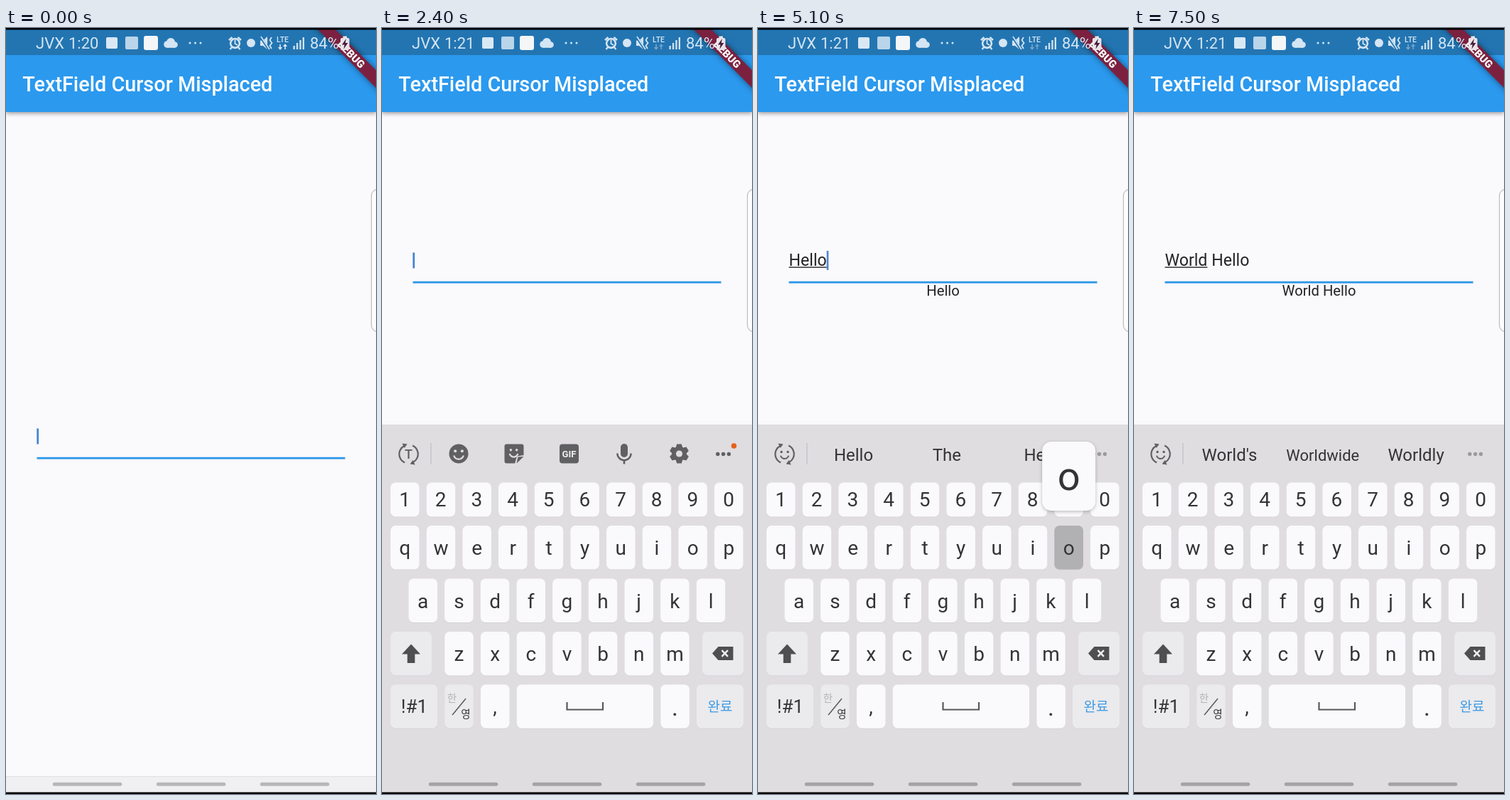
Recreate the animation shown at these times as an HTML page with a canvas. Size 521 by 1076 pixels, loop 8000 ms.

```html
<!DOCTYPE html>
<html lang="en">
<head>
<meta charset="utf-8">
<title>TextField Cursor Misplaced</title>
<style>
html, body { margin: 0; width: 100%; height: 100%; overflow: hidden; background: #faf9fb; }
canvas { display: block; width: 521px; height: 1076px; }
</style>
</head>
<body>
<canvas id="stage"></canvas>
<script>
const W = 521, H = 1076, LOOP = 8000, STEP = 100;
const ROBOTO = 'Roboto, sans-serif';
const KOREAN = '"Noto Sans CJK KR", "Noto Sans CJK", sans-serif';
const INK = '#343336', ICON = '#605f62', BAR = '#d4e5f3', BLUE = '#2b97e8';
const PITCH = 50.67, LEFT = 43.5;

const canvas = document.getElementById('stage');
const dpr = window.devicePixelRatio || 1;
canvas.width = W * dpr;
canvas.height = H * dpr;
const c = canvas.getContext('2d');

// Each entry changes part of the state from its time on.
const timeline = [
  [0, { clock: '1:20', caret: true, pos: 0, text: '', comp: 0, slide: 1, up: false,
        lang: 'ko', upper: false, press: '', words: null, busy: true }],
  [100, { clock: '1:21' }],
  [400, { slide: 0.5 }],
  [500, { slide: 0.12, up: true }],
  [600, { slide: 0 }],
  [1300, { caret: false }],
  [1400, { busy: false }],
  [1900, { caret: true, press: 'lang' }],
  [2100, { lang: 'en' }],
  [2200, { press: '' }],
  [2800, { caret: false }],
  [2900, { upper: true }],
  [3200, { press: 'h', caret: true }],
  [3300, { text: 'H', pos: 1, comp: 1 }],
  [3400, { press: '', upper: false }],
  [3600, { press: 'e' }],
  [3700, { text: 'He', pos: 2, comp: 2 }],
  [3800, { press: '' }],
  [3900, { words: ['Hello', 'The', "He's"] }],
  [4200, { caret: false }],
  [4400, { press: 'l' }],
  [4500, { text: 'Hel', pos: 3, comp: 3, caret: true }],
  [4600, { press: '' }],
  [4700, { press: 'l' }],
  [4800, { text: 'Hell', pos: 4, comp: 4 }],
  [4900, { press: '' }],
  [5000, { press: 'o' }],
  [5100, { text: 'Hello', pos: 5, comp: 5 }],
  [5200, { press: '' }],
  [5300, { pos: 0, comp: 0, words: null }],
  [5400, { press: 'space' }],
  [5500, { text: ' Hello', pos: 1, press: '' }],
  [5700, { press: 'shift', upper: true }],
  [5800, { press: '' }],
  [6000, { press: 'w' }],
  [6100, { text: 'W Hello', pos: 1, comp: 1 }],
  [6200, { press: '', upper: false }],
  [6300, { press: 'o' }],
  [6400, { text: 'Wo Hello', pos: 2, comp: 2 }],
  [6500, { press: 'r' }],
  [6600, { text: 'Wor Hello', pos: 3, comp: 3, press: '' }],
  [6800, { press: 'l' }],
  [6900, { text: 'Worl Hello', pos: 4, comp: 4 }],
  [7000, { press: '' }],
  [7100, { press: 'd' }],
  [7200, { text: 'World Hello', pos: 5, comp: 5 }],
  [7300, { press: '', words: ["World's", 'Worldwide', 'Worldly'] }],
  [7500, { caret: false }]
];

const layouts = {
  en: ['qwertyuiop', 'asdfghjkl', 'zxcvbnm'],
  ko: ['ㅂㅈㄷㄱㅅㅛㅕㅑㅐㅔ', 'ㅁㄴㅇㄹㅎㅗㅓㅏㅣ', 'ㅋㅌㅊㅍㅠㅜㅡ']
};
const rows = [{ x: 12, y: 699 }, { x: 37.4, y: 773.5 }, { x: 88.2, y: 848 }];

function stateAt(ms) {
  return Object.assign({}, ...timeline.filter(e => e[0] <= ms).map(e => e[1]));
}

function rect(x, y, w, h, color) {
  c.fillStyle = color;
  c.fillRect(x, y, w, h);
}

function roundPath(x, y, w, h, r) {
  c.beginPath();
  c.moveTo(x + r, y);
  c.arcTo(x + w, y, x + w, y + h, r);
  c.arcTo(x + w, y + h, x, y + h, r);
  c.arcTo(x, y + h, x, y, r);
  c.arcTo(x, y, x + w, y, r);
  c.closePath();
}

function round(x, y, w, h, r, color) {
  roundPath(x, y, w, h, r);
  c.fillStyle = color;
  c.fill();
}

function dot(x, y, r, color) {
  c.beginPath();
  c.arc(x, y, r, 0, 2 * Math.PI);
  c.fillStyle = color;
  c.fill();
}

function arc(x, y, r, from, to, color, width) {
  c.beginPath();
  c.arc(x, y, r, from, to);
  c.strokeStyle = color;
  c.lineWidth = width;
  c.stroke();
}

function line(points, color, width) {
  c.beginPath();
  points.forEach(([x, y], i) => i ? c.lineTo(x, y) : c.moveTo(x, y));
  c.strokeStyle = color;
  c.lineWidth = width;
  c.stroke();
}

function poly(points, color) {
  c.beginPath();
  points.forEach(([x, y]) => c.lineTo(x, y));
  c.closePath();
  c.fillStyle = color;
  c.fill();
}

function label(str, x, y, size, color, align = 'left', weight = 400, family = ROBOTO) {
  c.font = `${weight} ${size}px ${family}`;
  c.textAlign = align;
  c.fillStyle = color;
  c.fillText(str, x, y);
}

function widthOf(str, size) {
  c.font = `400 ${size}px ${ROBOTO}`;
  return c.measureText(str).width;
}

function drawHeader() {
  c.save();
  c.shadowColor = 'rgba(0,0,0,0.4)';
  c.shadowBlur = 6 * dpr;
  c.shadowOffsetY = 2 * dpr;
  rect(0, 2, W, 116, '#2b99ee');
  c.restore();
  rect(0, 2, W, 36, '#2375b2');
  label('TextField Cursor Misplaced', 23.2, 89, 28.8, '#fff', 'left', 500);
}

function drawRibbon() {
  c.save();
  c.translate(W, 2);
  c.rotate(Math.PI / 4);
  c.save();
  c.shadowColor = 'rgba(0,0,0,0.5)';
  c.shadowBlur = 8 * dpr;
  rect(-90, 40.5, 180, 17.4, '#7b213f');
  c.restore();
  label('DEBUG', 0, 54.5, 14.8, '#fff', 'center', 900);
  c.restore();
}

function drawStatus(s) {
  label('JVX', 42, 29, 22, BAR);
  label(s.clock, 88, 29, 22, BAR);
  round(141, 13, 16, 16, 2, '#d9e8f4');
  round(168, 12, 18, 18, 2, '#b9d5ea');
  round(194, 11, 20, 20, 3, '#f4f6f8');

  dot(227, 23, 4.8, BAR);
  dot(232, 20, 6, BAR);
  dot(237.5, 23.5, 4.3, BAR);
  rect(227, 22, 11, 5.8, BAR);
  [259, 266.5, 274].forEach(x => dot(x, 21, 1.5, BAR));

  // Alarm
  arc(322.5, 21.5, 6.4, 0, 2 * Math.PI, BAR, 2.6);
  line([[322.5, 17], [322.5, 22], [326, 24]], BAR, 1.8);
  line([[314, 17], [318.5, 13]], BAR, 2.4);
  line([[331, 17], [326.5, 13]], BAR, 2.4);
  line([[318, 27], [315.5, 30]], BAR, 2.2);
  line([[327, 27], [329.5, 30]], BAR, 2.2);
  dot(345, 21, 6, BAR);

  // Muted speaker with vibration
  poly([[358, 17.5], [362, 17.5], [368, 12], [368, 30], [362, 25], [358, 25]], BAR);
  line([[358, 12], [370, 30]], '#2375b2', 3.2);
  line([[359, 12], [371, 30]], BAR, 1.6);
  line([[374, 13], [371.5, 17], [374.5, 21], [371.5, 25], [374, 29]], BAR, 1.8);

  label('LTE', 389.5, 20, 10.5, BAR, 'center', 500);
  const up = s.busy ? BAR : '#6e9fc8', down = s.busy ? BAR : '#75a5cc';
  line([[386, 30], [386, 23]], down, 1.7);
  poly([[382.8, 27], [389.2, 27], [386, 31]], down);
  line([[393, 30], [393, 23]], up, 1.7);
  poly([[389.8, 26], [396.2, 26], [393, 22]], up);
  for (let i = 0; i < 4; i++) rect(404.5 + i * 4.4, 25 - i * 4, 2.3, 5 + i * 4, BAR);
  label('84%', 428, 29, 22, BAR);

  round(471, 14, 12.5, 17, 2, '#e9e4ea');
  rect(474.5, 11.5, 5.5, 3, '#e9e4ea');
  poly([[479, 15], [473, 23.5], [476.6, 23.5], [475.5, 29.5], [481.5, 21], [477.8, 21]], '#451d3a');
}

function drawField(s) {
  const y = s.up ? 0 : 247;
  if (s.text) {
    label(s.text, LEFT, 334 + y, 23.15, '#232225');
    label(s.text, 260.5, 376 + y, 20.26, '#232225', 'center');
    if (s.comp) rect(LEFT, 335.4 + y, widthOf(s.text.slice(0, s.comp), 23.15), 1.5, '#343336');
  }
  if (s.caret) {
    const x = LEFT + widthOf(s.text.slice(0, s.pos), 23.15);
    if (s.text) rect(x, 313 + y, 2.6, 27, '#4a86d2');
    else rect(43.3, 315.5 + y, 2.8, 22, '#4586d2');
  }
  rect(LEFT, 355.8 + y, 434, 2.8, BLUE);
}

function drawEdgePanel() {
  roundPath(514.5, 226.5, 30, 200, 9);
  c.fillStyle = '#fdfdfe';
  c.fill();
  c.strokeStyle = '#bcbbbd';
  c.lineWidth = 1.2;
  c.stroke();
}

function drawModeIcon(x, y, words) {
  arc(x, y, 13.2, 2.0, 4.25, ICON, 2.2);
  arc(x, y, 13.2, 5.15, 7.4, ICON, 2.2);
  poly([[x - 9, y - 15], [x - 2, y - 14], [x - 6, y - 8.5]], ICON);
  poly([[x + 9, y + 15], [x + 2, y + 14], [x + 6, y + 8.5]], ICON);
  if (words) {
    dot(x - 4.5, y - 3, 1.7, ICON);
    dot(x + 4.5, y - 3, 1.7, ICON);
    arc(x, y + 0.5, 6, 0.3, Math.PI - 0.3, ICON, 2);
  } else {
    label('T', x, y + 6.5, 18, ICON, 'center', 500);
  }
}

function drawFace(x, y, r, bg) {
  dot(x - r * 0.36, y - r * 0.28, r * 0.15, bg);
  dot(x + r * 0.36, y - r * 0.28, r * 0.15, bg);
  arc(x, y + r * 0.05, r * 0.52, 0.25, Math.PI - 0.25, bg, 2.2);
}

function drawGear(x, y, bg) {
  for (let i = 0; i < 6; i++) {
    c.save();
    c.translate(x, y);
    c.rotate(i * Math.PI / 3);
    poly([[-5, -8], [-3.3, -13.5], [3.3, -13.5], [5, -8]], ICON);
    c.restore();
  }
  dot(x, y, 10.3, ICON);
  dot(x, y, 4.6, bg);
}

function drawToolbar(s, bg) {
  drawModeIcon(37.5, 598.5, s.words);
  rect(68.2, 583, 1.3, 30, '#c3c1c5');
  const dots = s.words ? '#9c9b9e' : ICON;
  [472.8, 480.6, 488.4].forEach(x => dot(x, 598.5, 2.7, dots));
  if (s.words) {
    s.words.forEach((w, i) =>
      label(w, 134.5 + 131.3 * i, 607.5, w.length > 8 ? 22 : 24, INK, 'center'));
    return;
  }
  dot(108, 598, 13.5, ICON);
  drawFace(108, 598, 13.5, bg);

  // Sticker with a folded corner
  round(172.5, 584.5, 27, 27, 3, ICON);
  poly([[200, 600], [200, 612], [187, 612], [190, 601.5]], bg);
  poly([[199.5, 602], [191.5, 602.5], [189.5, 611.5]], ICON);
  drawFace(185.5, 596, 11.5, bg);

  round(250, 584.5, 27, 27, 4, ICON);
  label('GIF', 263.5, 603, 13.2, '#eeedf0', 'center', 700);

  // Microphone
  round(336, 584, 10, 19, 5, ICON);
  arc(341, 597.5, 9.6, 0, Math.PI, ICON, 2.4);
  line([[341, 607], [341, 612.5]], ICON, 2.6);

  drawGear(418.5, 598, bg);
  dot(495.5, 587, 3.8, '#e5621c');
}

function key(x, y, w, h, pressed, soft) {
  round(x, y + 0.8, w, h, 7, '#d2d0d4');
  round(x, y, w, h, 7, pressed ? '#b1b0b2' : soft ? '#ebeaed' : '#faf9fb');
}

function drawLetters(s) {
  let popup = null;
  layouts[s.lang].forEach((row, r) => {
    [...row].forEach((ch, i) => {
      const x = rows[r].x + i * PITCH, y = rows[r].y, on = s.press === ch;
      key(x, y, 40.6, 61.5, on);
      const shown = s.upper ? ch.toUpperCase() : ch;
      if (s.lang === 'ko') label(shown, x + 20.3, y + 40, 25, INK, 'center', 400, KOREAN);
      else label(shown, x + 20.3, y + 41.3, 28, INK, 'center');
      if (on) popup = { ch: shown, x: x + 20.3, y };
    });
  });
  return popup;
}

function drawPopup({ ch, x, y }) {
  const left = Math.min(Math.max(x - 37.5, 3), W - 78);
  c.save();
  c.shadowColor = 'rgba(0,0,0,0.25)';
  c.shadowBlur = 5 * dpr;
  c.shadowOffsetY = 1.5 * dpr;
  round(left, y - 118, 75, 97, 13, '#faf9fb');
  c.restore();
  label(ch, left + 37.5, y - 50, 56, INK, 'center');
}

function drawFunctionKeys(s) {
  key(12, 848, 58, 61.5, s.press === 'shift', true);
  poly([[41, 865.5], [54, 879.5], [46.3, 879.5], [46.3, 892], [35.7, 892], [35.7, 879.5], [28, 879.5]], '#4f4e51');

  key(451, 848, 58, 61.5, false, true);
  poly([[465, 878.5], [473.5, 869], [494.5, 869], [494.5, 888], [473.5, 888]], '#4f4e51');
  line([[478.5, 874.2], [487, 882.8]], '#f1f0f3', 2.4);
  line([[487, 874.2], [478.5, 882.8]], '#f1f0f3', 2.4);

  const y = 922.3, h = 61.5;
  key(12, y, 66, h, false, true);
  label('!#1', 45.5, 962, 26, INK, 'center');

  key(88.2, y, 40.6, h, s.press === 'lang', true);
  const ko = s.lang === 'ko', dim = '#b3b2b5';
  label('한', 98.5, 947, 14.5, ko ? INK : dim, 'center', 400, KOREAN);
  label('영', 118, 968.5, 14.5, ko ? dim : INK, 'center', 400, KOREAN);
  line([[99, 965], [118, 942]], '#59585b', 1.5);

  key(139, y, 40.6, h);
  label(',', 159, 963, 28, INK, 'center');
  key(189.7, y, 192.3, h, s.press === 'space');
  line([[260.5, 947], [260.5, 957.5], [311, 957.5], [311, 947]], '#59585b', 2.2);
  key(392.3, y, 40.6, h);
  label('.', 412.5, 966, 34, INK, 'center');
  key(443, y, 66, h, false, true);
  label('완료', 476, 959.5, 19, '#3d9be3', 'center', 400, KOREAN);
}

function drawKeyboard(s) {
  const bg = '#dfdde0';
  c.save();
  c.translate(0, s.slide * 517);
  rect(0, 557, W, 519, bg);
  drawToolbar(s, bg);
  [...'1234567890'].forEach((ch, i) => {
    key(12 + i * PITCH, 638.5, 40.6, 48, false);
    label(ch, 32 + i * PITCH, 672.3, 28, INK, 'center');
  });
  const popup = drawLetters(s);
  drawFunctionKeys(s);
  if (popup) drawPopup(popup);
  c.restore();
}

function drawNav(s) {
  if (s.slide > 0) {
    rect(0, 1051, W, 23, '#f0eff1');
    rect(0, 1051, W, 1, '#dfdee0');
  }
  const color = s.slide > 0 ? '#b8b6b9' : '#a5a3a6';
  for (let i = 0; i < 3; i++) round(65.8 + i * 146, 1059.8, 97.5, 5, 2.5, color);
  rect(0, 1073.5, W, 2.5, '#000');
}

function draw(ms) {
  const s = stateAt(Math.floor(ms / STEP) * STEP);
  c.setTransform(dpr, 0, 0, dpr, 0, 0);
  rect(0, 0, W, H, '#faf9fb');
  drawHeader();
  drawField(s);
  drawRibbon();
  drawStatus(s);
  rect(0, 0, W, 2.5, '#000');
  if (s.slide < 1) drawKeyboard(s);
  drawEdgePanel();
  drawNav(s);
}

const start = performance.now();
function tick() {
  draw((performance.now() - start) % LOOP);
  requestAnimationFrame(tick);
}
tick();
</script>
</body>
</html>
```
